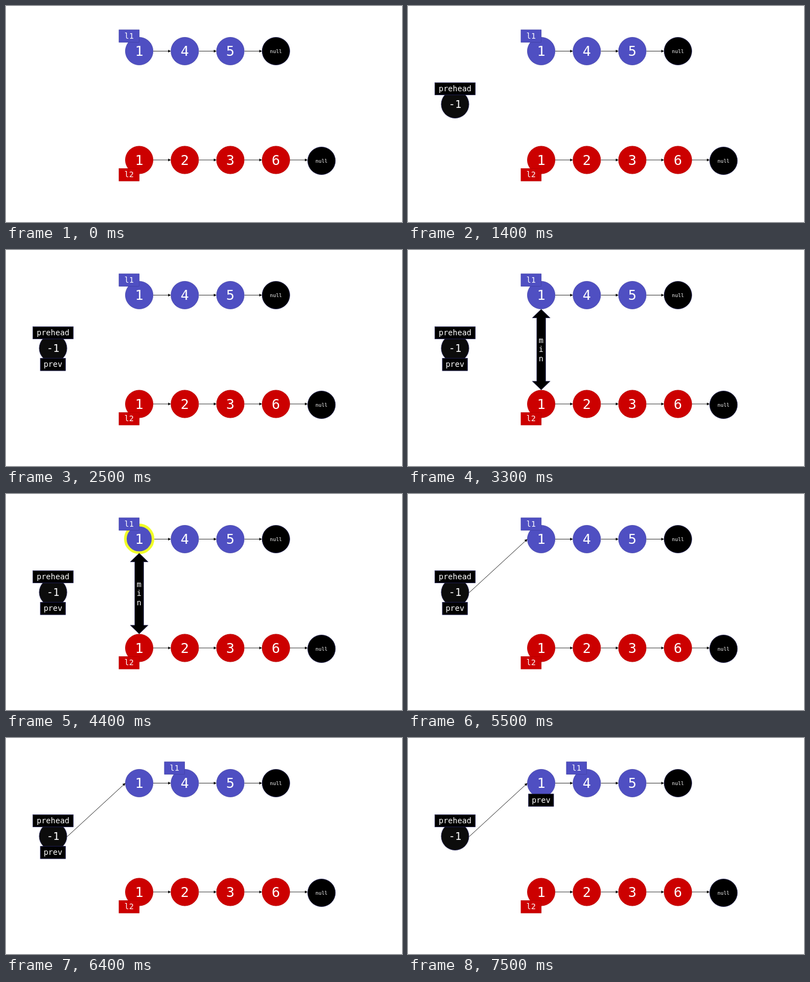
An HTML page for the animation above (8 s loop, 715 by 390 pixels).

```html
<!DOCTYPE html>
<html lang="en">
<head>
<meta charset="utf-8">
<title>Merging two linked lists</title>
<style>
  html, body { margin: 0; width: 100%; height: 100%; overflow: hidden; background: #fff; }
  svg { display: block; width: 100vw; height: 100vh; }
  text { font-family: "DejaVu Sans Mono", "Noto Sans Mono", monospace; fill: #fff; text-anchor: middle; }
</style>
</head>
<body>
<svg id="stage" viewBox="0 0 715 390"></svg>
<script>
const LOOP = 8000;
const BLUE = '#4f4fc2', RED = '#cc0000', BLACK = '#000', EDGE = '#24245c';
const stage = document.getElementById('stage');

function add(parent, tag, attrs, content) {
  const el = document.createElementNS('http://www.w3.org/2000/svg', tag);
  for (const key in attrs) el.setAttribute(key, attrs[key]);
  if (content) el.textContent = content;
  parent.appendChild(el);
  return el;
}

const group = () => add(stage, 'g', {});

function write(parent, x, y, size, content) {
  add(parent, 'text', { x, y, 'font-size': size }, content);
}

function node(parent, x, y, fill, edge, label, size) {
  add(parent, 'circle', { cx: x, cy: y, r: 25, fill, stroke: edge, 'stroke-width': 0.8 });
  write(parent, x, y + size * 0.35, size, label);
}

function tag(x, y, w, h, fill, edge, label) {
  const g = group();
  add(g, 'rect', { x, y, width: w, height: h, fill, stroke: edge, 'stroke-width': 0.8 });
  write(g, x + w / 2, y + h / 2 + 4.7, 14, label);
  return g;
}

function link(parent, x1, y1, x2, y2) {
  const angle = Math.atan2(y2 - y1, x2 - x1) * 180 / Math.PI;
  const length = Math.hypot(x2 - x1, y2 - y1);
  const g = add(parent, 'g', { transform: `translate(${x1} ${y1}) rotate(${angle})` });
  add(g, 'path', { d: `M0 0H${length - 3}`, stroke: BLACK, 'stroke-width': 0.8 });
  add(g, 'path', { d: `M${length} 0l-5 -2.5v5z` });
}

const nodeX = i => 240.5 + i * 82.3;

function list(y, values, fill, edge, nullY) {
  const g = group();
  values.forEach((value, i) => {
    link(g, nodeX(i) + 25.5, y, nodeX(i + 1) - 25, y);
    node(g, nodeX(i), y, fill, edge, value, 25);
  });
  node(g, nodeX(values.length), nullY, BLACK, EDGE, 'null', 9);
}

list(81.5, ['1', '4', '5'], BLUE, '#4343a8', 81.5);
list(278, ['1', '2', '3', '6'], RED, '#b80000', 279.5);

const ring = add(stage, 'circle', {
  cx: 240.5, cy: 81, r: 25, fill: 'none', stroke: '#f0ff28', 'stroke-width': 4.8
});

const compare = group();
add(compare, 'path', {
  d: 'M240.5 107L256.5 122.5H248.5V237H256.5L240.5 252.5L224.5 237H232.5V122.5H224.5Z',
  fill: BLACK, stroke: EDGE, 'stroke-width': 0.8
});
[...'min'].forEach((letter, i) => write(compare, 240.3, 168 + i * 16.3, 14, letter));

const headLink = group();
link(headLink, 110.5, 178, 215.5, 81.5);

const head = group();
node(head, 85, 177.5, '#0c0c0c', EDGE, '-1', 19);
const headTag = tag(48.5, 138.5, 73, 22, BLACK, EDGE, 'prehead');
const prev = tag(62, 195.5, 45.5, 22.5, BLACK, EDGE, 'prev');
const l1 = tag(204, 43, 36.5, 22.5, BLUE, '#4343a8', 'l1');
tag(204, 293.5, 36.5, 22.5, RED, '#b80000', 'l2');

const show = (el, on) => el.setAttribute('visibility', on ? 'visible' : 'hidden');
const shift = (el, x, y) => el.setAttribute('transform', `translate(${x} ${y})`);

function draw(t) {
  show(head, t >= 1400);
  show(headTag, t >= 1400);
  show(prev, t >= 2500);
  show(compare, t >= 3300 && t < 5500);
  show(ring, t >= 4400 && t < 5500);
  show(headLink, t >= 5500);
  shift(l1, t >= 6400 ? 82 : 0, 0);
  if (t >= 7500) shift(prev, 155.5, -94.5);
  else shift(prev, 0, 0);
}

const start = performance.now();
function tick() {
  draw((performance.now() - start) % LOOP);
  requestAnimationFrame(tick);
}
tick();
</script>
</body>
</html>
```
